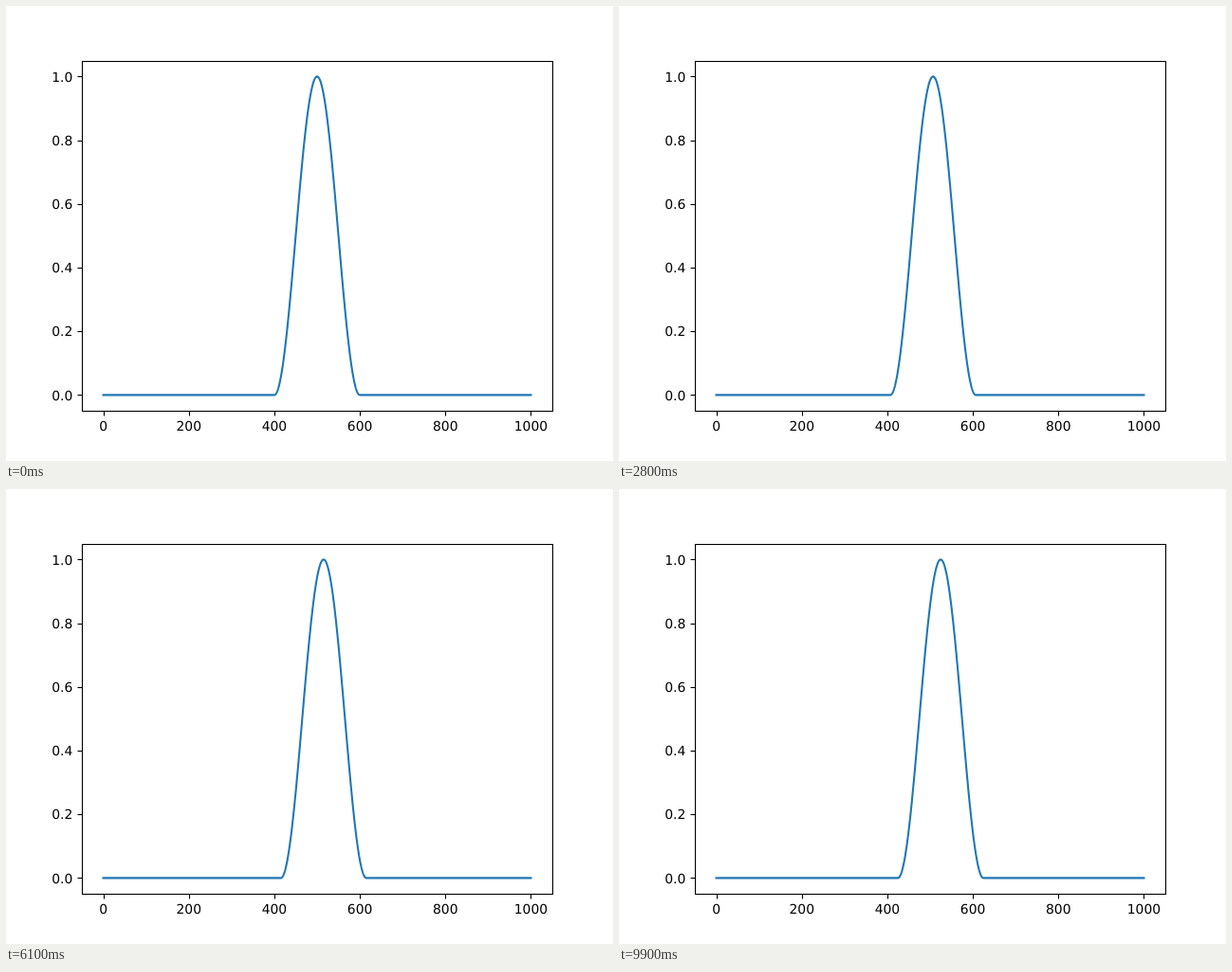
Write an HTML page that moves like this. It is 640 px wide and 480 px high and loops after 10 s.

```html
<!DOCTYPE html>
<html lang="en">
<head>
<meta charset="utf-8">
<title>Travelling pulse</title>
<style>
  html, body { margin: 0; width: 100%; height: 100%; overflow: hidden; background: #fff; }
  svg { display: block; width: 640px; height: 480px; }
  text { font: 13.889px "DejaVu Sans", sans-serif; fill: #000; text-rendering: geometricPrecision; }
  .axis { fill: none; stroke: #000; stroke-width: 1.11; }
  .curve { fill: none; stroke: #1f77b4; stroke-width: 2.083; stroke-linejoin: round; stroke-linecap: square; }
</style>
</head>
<body>
<svg viewBox="0 0 640 480">
  <g id="ticks"></g>
  <path id="curve" class="curve"/>
  <rect class="axis" x="80.5" y="58.5" width="496" height="369"/>
</svg>
<script>
const SVG_NS = "http://www.w3.org/2000/svg";
const LOOP = 10000, STEP = 100;
const SPEED = 0.25;            // data units per step
const PULSE_START = 400, PULSE_WIDTH = 200;

const ticks = document.getElementById("ticks");
const curve = document.getElementById("curve");

const toX = x => 102.5455 + x * 0.450909;
const toY = y => 410.4 - y * 336;

function add(name, attributes, content = "") {
  const node = document.createElementNS(SVG_NS, name);
  for (const key in attributes) node.setAttribute(key, attributes[key]);
  node.textContent = content;
  ticks.appendChild(node);
}

function drawTicks() {
  for (let i = 0; i <= 5; i++) {
    const x = toX(i * 200), y = toY(i / 5);
    add("path", { class: "axis", d: `M${Math.round(x) + 0.5} 427.5v5` });
    add("text", { x, y: 448, "text-anchor": "middle" }, i * 200);
    add("path", { class: "axis", d: `M80.5 ${Math.round(y) + 0.5}h-5` });
    add("text", { x: 70.28, y: Math.round(y + 5.27), "text-anchor": "end" }, (i / 5).toFixed(1));
  }
}

function pulse(x) {
  const u = (x - PULSE_START) / PULSE_WIDTH;
  return u > 0 && u < 1 ? Math.sin(Math.PI * u) ** 2 : 0;
}

function render(time) {
  const shift = Math.floor((time % LOOP) / STEP) * SPEED;
  const points = [];
  for (let x = 0; x <= 1000; x++) {
    points.push(`${toX(x).toFixed(2)} ${toY(pulse(x - shift)).toFixed(2)}`);
  }
  curve.setAttribute("d", "M" + points.join("L"));
}

drawTicks();
render(0);
const start = performance.now();
function tick() {
  render(performance.now() - start);
  requestAnimationFrame(tick);
}
requestAnimationFrame(tick);
</script>
</body>
</html>
```
